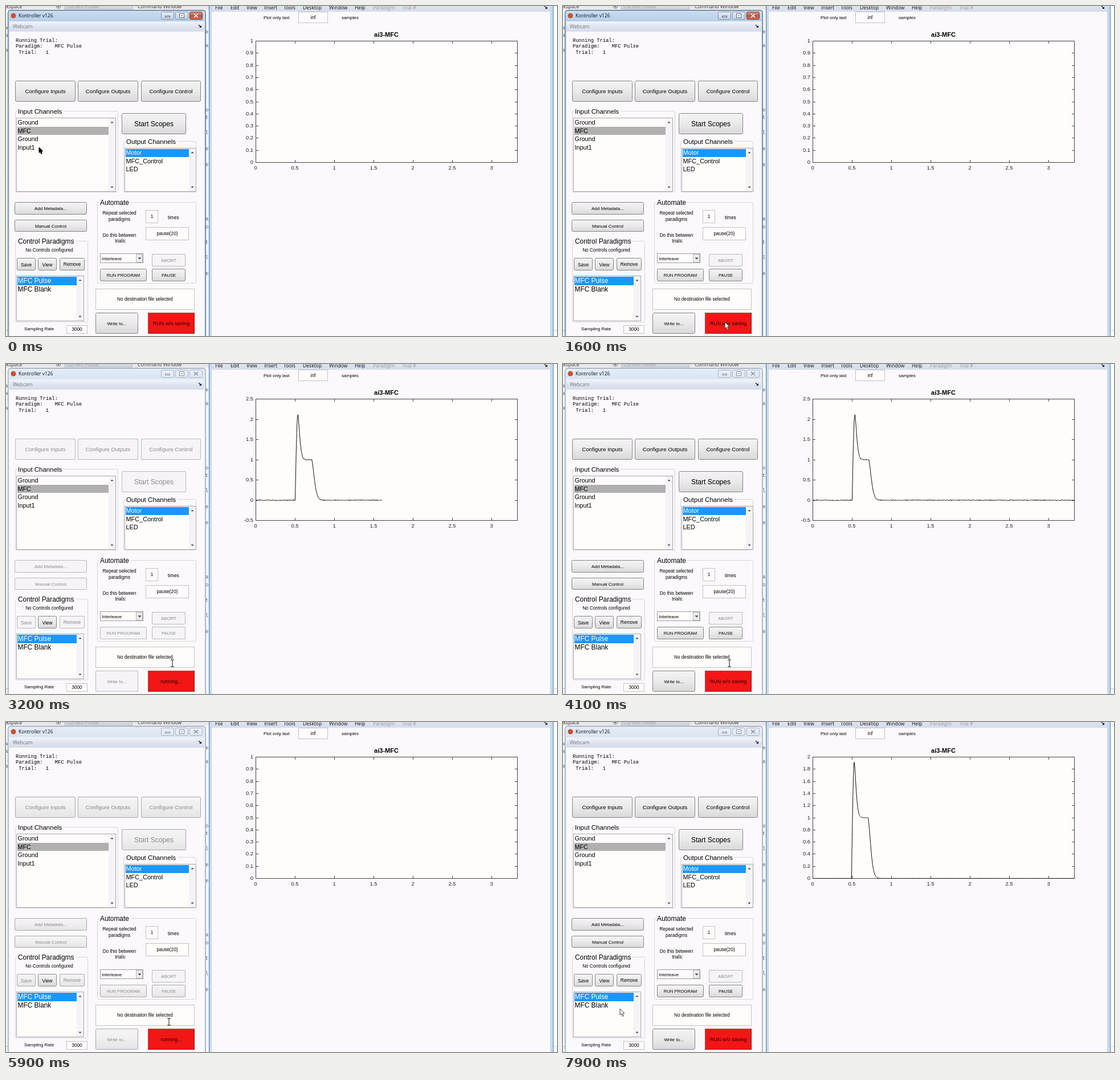
An HTML page with a canvas for the animation above (8 s loop, 967 by 579 pixels).

```html
<!DOCTYPE html>
<html lang="en">
<head>
<meta charset="utf-8">
<title>Kontroller</title>
<style>
html, body { margin: 0; width: 100%; height: 100%; overflow: hidden; background: #fff; }
canvas { display: block; }
</style>
</head>
<body>
<canvas id="stage" width="967" height="579"></canvas>
<script>
const ctx = document.getElementById('stage').getContext('2d');
const LOOP = 8000, STEP = 100;
const SANS = '"Liberation Sans", Arial, sans-serif';
const MENU = '"Open Sans", "Noto Sans", sans-serif';
const MONO = '"Liberation Mono", monospace';
const BODY = '#fcf9fc', PAPER = '#fffcfb', BLUE = '#1c96f8', GREY = '#b0b0b0';

const runs = [
  { lock: 2300, start: 2400, end: 4100, peak: 2.12, shift: 0, noise: 0.012, early: [-0.02, 0.1, 0.02], full: [-0.5, 2.5, 0.5] },
  { lock: 5800, start: 5900, end: 7600, peak: 1.92, shift: -0.008, noise: 0.002, early: [0, 0.02, 0.005], full: [0, 2, 0.2] }
];

// Pointer path: time, x, y
const path = [
  [0, 58, 248], [200, 50, 218], [300, 50, 218], [600, 80, 352], [700, 130, 390], [800, 197, 451],
  [900, 285, 552], [1700, 284, 555], [1900, 292, 525], [4200, 292, 525], [4700, 284, 568],
  [5500, 284, 555], [5600, 286, 526], [7500, 286, 526], [7700, 200, 515], [7900, 100, 503]
];

function text(s, x, y, size, { align = 'left', color = '#000', font = SANS, weight = '' } = {}) {
  ctx.font = `${weight} ${size}px ${font}`;
  ctx.textAlign = align;
  ctx.fillStyle = color;
  ctx.fillText(s, x, y + size * 0.36);
}

function rect(x, y, w, h, fill, stroke) {
  if (fill) { ctx.fillStyle = fill; ctx.fillRect(x, y, w, h); }
  if (stroke) {
    ctx.strokeStyle = stroke;
    ctx.lineWidth = 1;
    ctx.strokeRect(x + 0.5, y + 0.5, w - 1, h - 1);
  }
}

function rounded(x, y, w, h, r, fill, stroke) {
  ctx.beginPath();
  ctx.roundRect(x + 0.5, y + 0.5, w - 1, h - 1, r);
  if (fill) { ctx.fillStyle = fill; ctx.fill(); }
  ctx.strokeStyle = stroke;
  ctx.lineWidth = 1;
  ctx.stroke();
}

function shade(y, h, ...colors) {
  const g = ctx.createLinearGradient(0, y, 0, y + h);
  colors.forEach((c, i) => g.addColorStop(i / (colors.length - 1), c));
  return g;
}

function polygon(points, fill, stroke) {
  ctx.beginPath();
  points.forEach(([x, y]) => ctx.lineTo(x, y));
  ctx.closePath();
  ctx.fillStyle = fill;
  ctx.fill();
  if (stroke) { ctx.strokeStyle = stroke; ctx.lineWidth = 1; ctx.stroke(); }
}

// `lock` runs from 0 (enabled) to 1 (fully faded out)
function button(label, x, y, w, h, size, lock = 0, hover = false) {
  const fill = hover ? shade(y, h, '#e6f5fd', '#c9e9fb', '#a5d9f5') : shade(y, h, '#f5f4f5', '#ebeaeb', '#d9d8d9');
  rounded(x, y, w, h, 2, fill, hover ? '#3c7fb1' : '#858585');
  if (lock) {
    ctx.globalAlpha = lock;
    rounded(x, y, w, h, 2, '#f6f4f6', '#b8babd');
    ctx.globalAlpha = 1;
  }
  text(label, x + w / 2, y + h / 2 + 0.5, size, { align: 'center', color: lock ? '#8b8b8b' : '#000' });
}

function panel(title, x, y, w, h, size) {
  rounded(x, y, w, h, 2, null, '#d8d5d9');
  ctx.font = `${size}px ${SANS}`;
  rect(x + 4, y - 2, ctx.measureText(title).width + 4, 5, BODY);
  text(title, x + 5, y + 1, size);
}

function field(label, x, y, w, h) {
  rect(x, y, w, h, PAPER, '#c4c2c6');
  text(label, x + w / 2, y + h / 2, 8.2, { align: 'center' });
}

function arrow(x, y, dir, size = 2.5) {
  polygon([[x - size, y - dir * size / 2], [x + size, y - dir * size / 2], [x, y + dir * size / 2]], '#333');
}

function list(rows, selected, color, x, y, w, h, pitch, size) {
  rect(x, y, w, h, PAPER, '#a6a7ae');
  rect(x + w - 13, y + 1, 12, h - 2, '#f5f3f6');
  arrow(x + w - 7, y + 8, -1);
  arrow(x + w - 7, y + h - 8, 1);
  rows.forEach((row, i) => {
    const on = i === selected, mid = y + 8.5 + i * pitch;
    if (on) rect(x + 2, Math.round(mid - 7), w - 15, Math.round(pitch - 0.5), color);
    text(row, x + 2.5, mid, size, { color: on && color === BLUE ? '#fff' : '#000' });
  });
}

function dockMark(x, y) {
  ctx.strokeStyle = '#222';
  ctx.lineWidth = 1.2;
  ctx.beginPath();
  ctx.moveTo(x - 3, y - 3);
  ctx.lineTo(x + 1, y + 1);
  ctx.stroke();
  polygon([[x + 2, y - 2], [x + 2, y + 2], [x - 2, y + 2]], '#222');
}

function backdrop() {
  rect(0, 0, 967, 579, '#fff');
  rect(0, 0, 356, 7, '#e8e8ec');
  rect(102, -2, 120, 8, '#d5d7df', '#b7bac4');
  text('rkspace', -3, 1, 8.7, { font: MENU, color: '#333' });
  text('Current Folder', 106, 1, 8.6, { font: MENU, color: '#999' });
  text('Command Window', 231, 1, 8.7, { font: MENU, color: '#333' });
  ctx.beginPath();
  ctx.arc(92, 0, 4, 0, 7);
  ctx.strokeStyle = '#777';
  ctx.stroke();
  polygon([[90, 0], [94, 0], [92, 2.5]], '#555');
  // Slivers of editor text between the windows
  [45, 69, 182, 195, 222, 250, 278, 373, 387, 414, 441, 469].forEach((y, i) =>
    text('eaotle'[i % 6], 350, y, 8.8, { font: MONO, color: '#555' }));
  [38, 51, 77].forEach(y => text('a', -2, y, 8.8, { font: MONO, color: '#555' }));
  rect(0, 569, 4, 1, '#bbb');
  rect(960, 569, 7, 1, '#ccc');
}

function titleBar(active) {
  rounded(3, 7, 348, 590, 4, active ? '#b9d3ee' : '#dbe6f3', active ? '#40566f' : '#8495a8');
  rect(6, 9, 342, 18, shade(9, 18, active ? '#c9dcf0' : '#e4ecf6', active ? '#b5cfea' : '#dae5f2'));
  rect(6, 27, 342, 18, shade(27, 18, '#f4f5fa', '#dfe4f1', '#d6dbea'));
  ctx.beginPath();
  ctx.arc(13, 17, 4.5, 0, 7);
  ctx.fillStyle = '#c9502c';
  ctx.fill();
  text('Kontroller v126', 22, 17, 8.5, { font: MENU, color: '#111' });
  text('Webcam', 12, 36, 8.5, { font: MENU, color: '#777' });
  dockMark(341, 36);

  const edge = active ? '#667' : '#8a8f98';
  [272, 297, 322].forEach((x, i) => {
    const close = active && i === 2;
    rounded(x, 10, 23, 14, 2,
      close ? shade(10, 14, '#dda99c', '#c4523e', '#cc705a') : shade(10, 14, '#e8eff7', active ? '#bccee2' : '#e0e8f2'),
      close ? '#7a3428' : active ? '#8496aa' : '#a9b5c3');
  });
  rect(279, 17, 9, 3, '#fff', edge);
  rect(304, 13, 9, 8, '#fff', edge);
  rect(307, 16, 3, 2, '#9ab');
  ctx.strokeStyle = active ? '#fff' : edge;
  ctx.lineWidth = 1.6;
  ctx.beginPath();
  ctx.moveTo(330, 14); ctx.lineTo(337, 20);
  ctx.moveTo(337, 14); ctx.lineTo(330, 20);
  ctx.stroke();
}

function controlWindow(T, lock, running) {
  titleBar(T < 2300 || (T >= 4900 && T < 5800));
  rect(6, 45, 342, 540, BODY);

  ['Running Trial:', 'Paradigm:    MFC Pulse', ' Trial:   1'].forEach((s, i) =>
    text(s, 17, 59.5 + i * 10.5, 8.8, { font: MONO }));
  button('Configure Inputs', 16, 131, 106, 37, 9.7, lock);
  button('Configure Outputs', 126, 131, 106, 37, 9.7, lock);
  button('Configure Control', 237, 131, 105, 37, 9.7, lock);

  panel('Input Channels', 16, 184, 181, 143, 11.5);
  const listFocus = T >= 200 && T < 1400;
  list(['Ground', 'MFC', 'Ground', 'Input1'], 1, listFocus ? BLUE : GREY, 18, 196, 175, 130, 14.4, 10.8);
  button('Start Scopes', 203, 188, 113, 37, 12.1, lock);
  panel('Output Channels', 206, 237, 128, 90, 11.6);
  list(['Motor', 'MFC_Control', 'LED'], 0, BLUE, 208, 249, 126, 77, 14.5, 10.9);

  button('Add Metadata...', 15, 344, 127, 22, 8.1, lock, T >= 500 && T < 1000);
  button('Manual Control', 15, 375, 127, 21, 8.1, lock);

  panel('Control Paradigms', 16, 412, 128, 143, 11.9);
  text('No Controls configured', 76, 428, 8.2, { align: 'center' });
  button('Save', 19, 442, 33, 22, 8.4, lock);
  button('View', 56, 442, 33, 22, 8.4);
  button('Remove', 94, 442, 44, 22, 8.2, lock);
  list(['MFC Pulse', 'MFC Blank'], 0, BLUE, 18, 473, 119, 80, 15.5, 11.9);

  panel('Automate', 160, 344, 174, 143, 11.9);
  const centered = { align: 'center' };
  text('Repeat selected', 199, 363, 8.2, centered);
  text('paradigms', 199, 374, 8.2, centered);
  field('1', 245, 358, 22, 23);
  text('times', 284, 371, 8.2);
  text('Do this between', 199, 402, 8.2, centered);
  text('trials:', 201, 412, 8.2, centered);
  field('pause(20)', 245, 388, 76, 23);
  rect(165, 434, 76, 17, PAPER, '#9a9ca2');
  text('Interleave', 168, 443, 8);
  rect(228, 435, 12, 15, '#ececee', '#bbb');
  arrow(234.5, 443, 1, 3);
  button('ABORT', 256, 435, 59, 22, 7.9, 1);
  button('RUN PROGRAM', 165, 461, 82, 22, 7.7, lock);
  button('PAUSE', 256, 461, 59, 22, 7.6, lock);

  field('No destination file selected', 157, 496, 174, 37);
  button('Write to...', 157, 538, 75, 37, 8, lock);
  rect(249, 538, 82, 37, '#f31616', '#b44');
  rect(249, 574, 82, 1, '#722');
  rect(330, 538, 1, 37, '#722');
  text(running ? 'running...' : 'RUN w/o saving', 290, 556.5, 9, { align: 'center', color: '#2a0000' });
  text('Sampling Rate', 32, 566, 8);
  field('3000', 106, 560, 37, 15);
}

const jitter = i => { const v = Math.sin(i * 12.9898) * 43758.5453; return 2 * (v - Math.floor(v)) - 1; };

// Valve response: fast overshoot, settling to 1, then closing
function flow(u, peak) {
  const open = 0.5, top = 0.535, close = 0.71;
  if (u < open) return 0;
  if (u < top) return peak * Math.sin((u - open) / (top - open) * Math.PI / 2);
  if (u < close) return 1 + (peak - 1) * Math.exp(-(((u - top) / 0.031) ** 1.5));
  return Math.exp(-(((u - close) / 0.046) ** 1.6));
}

function plotWindow(T, run) {
  rect(356, 0, 605, 579, '#c3d9f0');
  rect(356, 0, 1, 579, '#4a6f9e');
  rect(960, 0, 1, 579, '#5d82ad');
  rect(361, 0, 594, 10, shade(0, 10, '#dfe4f1', '#d6dbea'));
  rect(361, 10, 594, 569, BODY);
  const menu = { File: 367, Edit: 394, View: 422, Insert: 453, Tools: 487, Desktop: 521, Window: 567, Help: 612, Paradigm: 644, 'Trial #': 695 };
  for (const [name, x] of Object.entries(menu))
    text(name, x, 3, 8.6, { font: MENU, color: x > 640 ? '#999' : '#111' });
  dockMark(948, 3);
  text('Plot only last', 452, 20, 8);
  field('inf', 513, 10, 52, 20);
  text('samples', 589, 20, 8);

  const L = 438, R = 897, top = 61, bottom = 274, unit = 137.9, ink = '#444';
  const seen = run ? Math.min(3.33, (T - run.start) / 500) : 0;
  const [lo, hi, step] = seen <= 0 ? [0, 1, 0.1] : seen <= 0.5 ? run.early : run.full;
  const toY = v => bottom - (v - lo) / (hi - lo) * (bottom - top);
  text('ai3-MFC', 667.5, 50, 11, { align: 'center', weight: 'bold' });
  rect(L, top, R - L + 1, bottom - top + 1, PAPER, ink);

  for (let i = 0; i <= Math.round((hi - lo) / step); i++) {
    const v = lo + i * step, y = Math.round(toY(v));
    rect(L, y, 5, 1, ink);
    rect(R - 4, y, 5, 1, ink);
    text(+v.toFixed(3), 434, y, 9.4, { align: 'right', color: '#222' });
  }
  for (let v = 0; v <= 3; v += 0.5) {
    const x = Math.round(L + v * unit);
    rect(x, top, 1, 5, ink);
    rect(x, bottom - 4, 1, 5, ink);
    text(v, x, 284, 9.4, { align: 'center', color: '#222' });
  }
  if (seen <= 0) return;
  ctx.beginPath();
  for (let i = 0; i * 0.004 <= seen; i++) {
    const u = i * 0.004;
    let noise = jitter(i) * run.noise;
    if (lo === 0) noise = Math.abs(noise);
    ctx.lineTo(L + 0.5 + u * unit, toY(flow(u - run.shift, run.peak) + noise) + 0.5);
  }
  ctx.strokeStyle = '#111';
  ctx.lineWidth = 1;
  ctx.stroke();
}

function pointer(T) {
  let i = 1;
  while (i < path.length - 1 && path[i][0] < T) i++;
  const [t0, x0, y0] = path[i - 1], [t1, x1, y1] = path[i];
  const k = (T - t0) / (t1 - t0), x = x0 + (x1 - x0) * k, y = y0 + (y1 - y0) * k;
  if (x > 157 && x < 331 && y > 497 && y < 533) {
    rect(x - 0.5, y - 6, 1, 12, '#111');
    rect(x - 3, y - 6.5, 6, 1, '#111');
    rect(x - 3, y + 5.5, 6, 1, '#111');
    return;
  }
  const dark = T < 300, size = dark ? 0.85 : 1;
  const shape = [[0, 0], [0, 11], [2.5, 9], [4.5, 13.5], [6.3, 12.7], [4.4, 8.3], [7.8, 8]];
  polygon(shape.map(([dx, dy]) => [x + dx * size, y + dy * size]), dark ? '#000' : '#fff', dark ? '#000' : '#444');
}

function draw(T) {
  const run = runs.filter(r => T >= r.lock).pop();
  const running = Boolean(run) && T < run.end;
  const lock = running ? Math.min(1, (T - run.lock + 100) / 500) : 0;
  backdrop();
  plotWindow(T, run);
  controlWindow(T, lock, running);
  pointer(T);
}

let shown = -1;
const began = performance.now();
function tick() {
  const T = Math.floor((performance.now() - began) % LOOP / STEP) * STEP;
  if (T !== shown) draw(shown = T);
  requestAnimationFrame(tick);
}
tick();
</script>
</body>
</html>
```
